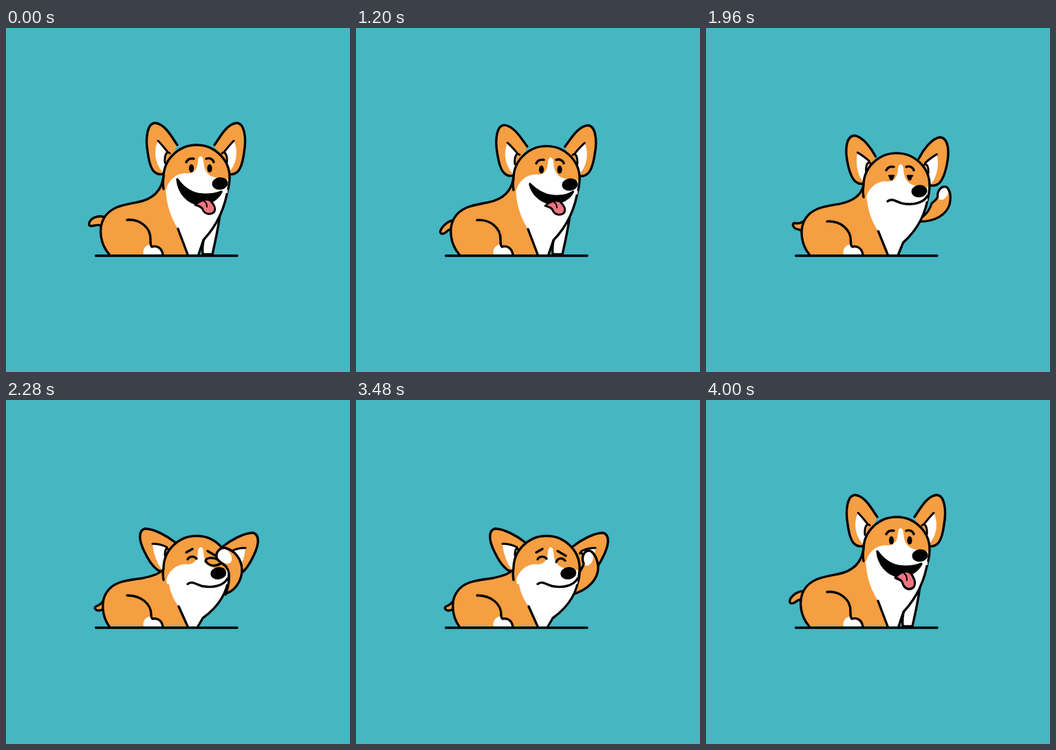
An HTML page that plays this animation: 500x500 px, repeating every 4040 ms.

```html
<!DOCTYPE html>
<html lang="en">
<head>
<meta charset="utf-8">
<title>Corgi</title>
<style>
html, body { margin: 0; height: 100%; overflow: hidden; background: #46b6c2; }
svg { display: block; width: 100%; height: 100%; }
</style>
</head>
<body>
<svg id="stage" viewBox="0 0 500 500" fill="none" stroke-linecap="round" stroke-linejoin="round"></svg>
<script>
const LOOP = 4040, STEP = 40;
const ORANGE = '#f59e42', WHITE = '#fff', BLACK = '#000', PINK = '#ef7482';
const stage = document.getElementById('stage');

// Poses: happy, alert, and bowed with a paw over the face
const ear = {
  happy: 'M249 170C241 159 232 140 217 138C206 138 202 158 206 181C208 196 212 207 217 210C220 213 225 213 230 212',
  alert: 'M247 172C245 158 238 136 226 133C213 133 207 154 210 181C211 196 214 206 219 208C222 210 226 210 230 209',
  bowed: 'M246 207C235 198 215 187 202 187C191 190 194 206 201 220C207 233 214 242 219 246C222 249 226 249 229 249'
};
const inner = {
  happy: 'M221 164C225 168 230 174 234 179L230 211C220 204 212 182 221 164',
  alert: 'M226 160C230 165 236 173 240 178L232 208C222 202 218 176 226 160',
  bowed: 'M213 209C220 209 227 210 234 214L227 247C220 238 214 224 213 209'
};
const tuft = {
  happy: 'M231 196C230 184 234 178 238 182',
  alert: 'M234 195C233 184 238 176 242 182',
  bowed: 'M231 226C231 217 233 214 236 217'
};
const tail = {
  mid: 'M146 276C136 271 124 275 121 283C119 289 125 288 129 287C133 286 138 286 143 289',
  up: 'M149 270C146 260 136 257 129 261C124 266 128 268 132 268C136 269 139 273 142 282',
  low: 'M143 279C133 279 124 288 122 295C122 301 128 299 131 296C134 292 138 291 142 292',
  alert: 'M149 267C142 275 134 275 127 271C122 271 124 278 128 281C133 284 136 285 141 292',
  bowed: 'M145 284C142 294 137 298 131 300C127 302 131 306 134 306C138 306 141 304 146 303'
};
const back = [
  'M150 329C137 314 134 292 142 277C152 259 172 257 192 253C212 249 226 238 229 216',
  'M150 329C139 314 138 292 146 280C156 263 178 262 198 259C214 256 224 252 229 246'
];
const chest = [
  'M232 233C233 256 239 275 250 292L264 329L280 329L287 308C302 292 318 268 323 230',
  'M236 260C237 273 241 287 251 300L264 329L279 329L286 317C304 304 322 284 324 254'
];
const chestLine = [
  'M280 329L287 308C302 292 318 268 323 230',
  'M279 329L286 317C304 304 322 284 324 254'
];
const legLine = ['M250 292L264 329', 'M251 300L264 329'];
const haunch = [
  'M176 279C194 277 211 290 210 308C210 314 210 316 212 318C219 316 226 319 228 329',
  'M176 284C196 284 211 296 211 312C211 315 211 317 213 318C219 317 226 319 228 329'
];
const arm = [
  'M310 284C341 276 352 258 352 243C351 233 348 223 340 219C331 218 327 229 331 238C330 243 327 246 325 250C325 258 324 268 310 284',
  'M321 281C334 276 343 262 343 246C342 231 333 219 319 215C310 214 303 223 307 231C312 239 322 238 324 252C325 263 323 273 319 283'
];
const paw = [
  'M331 238C327 229 332 220 339 220C346 224 346 232 341 238C338 241 333 242 331 238',
  'M307 230C305 222 312 216 319 217C327 221 331 231 326 237C320 239 311 236 307 230'
];
const thumb = [
  'M331 238C331 238 330 236 330 234C330 232 331 232 332 232',
  'M313 237C303 244 294 240 290 234C291 229 300 228 308 232'
];
const mouth = [
  'M264 240C270 235 275 240 285 243C300 246 316 243 322 232C316 243 300 246 285 243C275 240 270 235 264 240',
  'M249 220C258 233 270 241 285 242C297 243 306 241 313 238C308 248 297 256 282 257C264 254 251 240 249 220'
];

// Keys: time, value, time, value, ...
const bowKeys = [1120, 0, 1200, .06, 1320, -.2, 1480, 0, 1720, 0, 1840, -.18, 2080, 1.04, 2200, 1, 3480, 1, 3680, -.06, 3800, 0];
const alertKeys = [1040, 0, 1140, -.4, 1320, 1, 3480, 1, 3660, 0];
const armKeys = [1840, 0, 2000, 1, 2160, 2, 3360, 2, 3480, 1, 3640, 0];
const smileKeys = [1160, 1, 1280, 0, 3520, 0, 3660, 1];

const clamp = x => Math.min(1, Math.max(0, x));
const wave = (t, period) => Math.sin(2 * Math.PI * t / period);

function key(t, keys) {
  if (t <= keys[0]) return keys[1];
  for (let i = 2; i < keys.length; i += 2) {
    if (t < keys[i]) {
      const u = (t - keys[i - 2]) / (keys[i] - keys[i - 2]);
      return keys[i - 1] + (keys[i + 1] - keys[i - 1]) * u * u * (3 - 2 * u);
    }
  }
  return keys[keys.length - 1];
}

function mix(a, b, u) {
  const ends = b.match(/-?[\d.]+/g);
  let i = 0;
  return a.replace(/-?[\d.]+/g, n => (+n + (ends[i++] - n) * u).toFixed(2));
}

const fill = (d, color) => `<path d="${d}" fill="${color}"/>`;
const line = (d, color = 'none', width = 3.4) =>
  `<path d="${d}" fill="${color}" stroke="${BLACK}" stroke-width="${width}"/>`;
const group = (transform, body) => `<g transform="${transform}">${body}</g>`;
const oval = (x, y, rx, ry) => `<ellipse cx="${x}" cy="${y}" rx="${rx}" ry="${ry}" fill="${BLACK}"/>`;

function drawEar(alert, bow) {
  const pose = p => mix(mix(p.happy, p.alert, alert), p.bowed, bow);
  const white = pose(inner);
  return line(pose(ear), ORANGE) + fill(white, WHITE) +
    line(white.split('L')[0], 'none', 3) + line(pose(tuft), 'none', 3);
}

function drawTail(t, alert, bow) {
  const s = wave(t > 3000 ? t - LOOP : t, 320);
  const wag = mix(tail.mid, s > 0 ? tail.up : tail.low, Math.abs(s));
  return line(mix(mix(wag, tail.alert, clamp(alert)), tail.bowed, clamp(bow)), ORANGE);
}

function drawBody(bow) {
  const pose = p => mix(p[0], p[1], bow);
  const spine = pose(back);
  return fill(spine + 'L250 250L264 329Z', ORANGE) + fill(pose(chest) + 'Z', WHITE) +
    fill('M200 329C198 321 203 316 210 314L213 318C220 317 226 320 227 329Z', WHITE) +
    line(spine) + line(pose(haunch)) + line(pose(legLine)) + line(pose(chestLine));
}

function drawEyes(alert, bow) {
  if (bow > .45) {
    return line('M264 204C267 199 273 199 277 203') + line('M291 208C293 202 300 201 304 206') +
      line('M262 194L271 189') + line('M293 192L305 199');
  }
  const lids = alert > .5
    ? fill('M264 197H276V203H264ZM290 197H302V203H290Z', ORANGE) + line('M266 203H273M293 203H300', 'none', 2.6)
    : '';
  return oval(269.5, 204, 3.6, 6) + oval(296, 204, 3.6, 6) + lids +
    line('M262 195C264 191 268 189 273 190') + line('M291 190C296 188 301 191 302 195');
}

function drawHead(t, alert, bow, smile) {
  const skull = 'M229 234C228 228 228 222 229 217C229 191 251 170 277 170C303 170 325 191 325 217C325 224 324 229 323 234';
  const muzzle = 'M233 234C236 222 246 212 260 211C272 213 278 207 279 194C279 184 287 184 287 194C288 207 292 214 303 217L323 220L322 240H234Z';
  const pant = (1 - Math.cos(2 * Math.PI * t / 480)) / 2;
  const tongue = smile > .4
    ? group(`translate(0 251) scale(1 ${smile * (1 + .3 * pant)}) translate(0 -251)`,
        line('M275 257C281 251 291 247 297 251C302 256 306 263 302 268C297 272 289 271 286 264C285 260 281 259 275 257Z', PINK, 3) +
        line('M288 252C291 253 292 256 292 260', 'none', 2))
    : '';
  return fill(skull + 'Z', ORANGE) + fill(muzzle, WHITE) +
    line(skull) + drawEyes(alert, bow) +
    line(mix(mouth[0], mouth[1], smile), BLACK) + tongue +
    group('rotate(-8 311 226)', oval(311 - 2 * clamp(bow), 226 - 2 * clamp(bow), 11.5, 9));
}

function drawArm(raise, bow) {
  const u = clamp(raise - 1), low = 1 - clamp(raise);
  const pose = p => mix(p[0], p[1], u);
  return group(`translate(${318 - 8 * (1 - clamp(bow))} 280) rotate(${110 * low}) scale(${1 - .4 * low}) translate(-318 -280)`,
    (u > 0 ? line(pose(thumb), ORANGE) : '') +
    fill(pose(arm), ORANGE) + fill(pose(paw), WHITE) + line(pose(arm)));
}

function draw(t) {
  const alert = key(t, alertKeys), raise = key(t, armKeys), smile = key(t, smileKeys);
  const bow = key(t, bowKeys);
  const shake = t > 2280 && t < 3300 ? wave(t - 2280, 340) : 0;
  const ears = drawEar(alert, bow);
  const side = clamp(bow);
  const leg = 'M286 329C285 318 286 312 288 306L311 270C309 290 304 310 300 329Z';
  const limb = raise > .3 ? drawArm(raise, bow) : '';

  stage.innerHTML = drawTail(t, alert, bow) +
    group(`translate(${shake} 0)`, ears + group(`translate(${552 + 9 * side} ${6 * side}) scale(-1 1)`, ears)) +
    (raise > .3 ? '' : line(leg, WHITE)) +
    (raise <= 1 ? limb : '') + drawBody(bow) +
    group(`translate(${shake} ${27.5 * bow})`, drawHead(t, alert, bow, smile)) +
    (raise > 1 ? limb : '') + line('M130.5 331H336');
}

function tick(now) {
  draw(Math.floor(now % LOOP / STEP) * STEP);
  requestAnimationFrame(tick);
}
draw(0);
requestAnimationFrame(tick);
</script>
</body>
</html>
```
